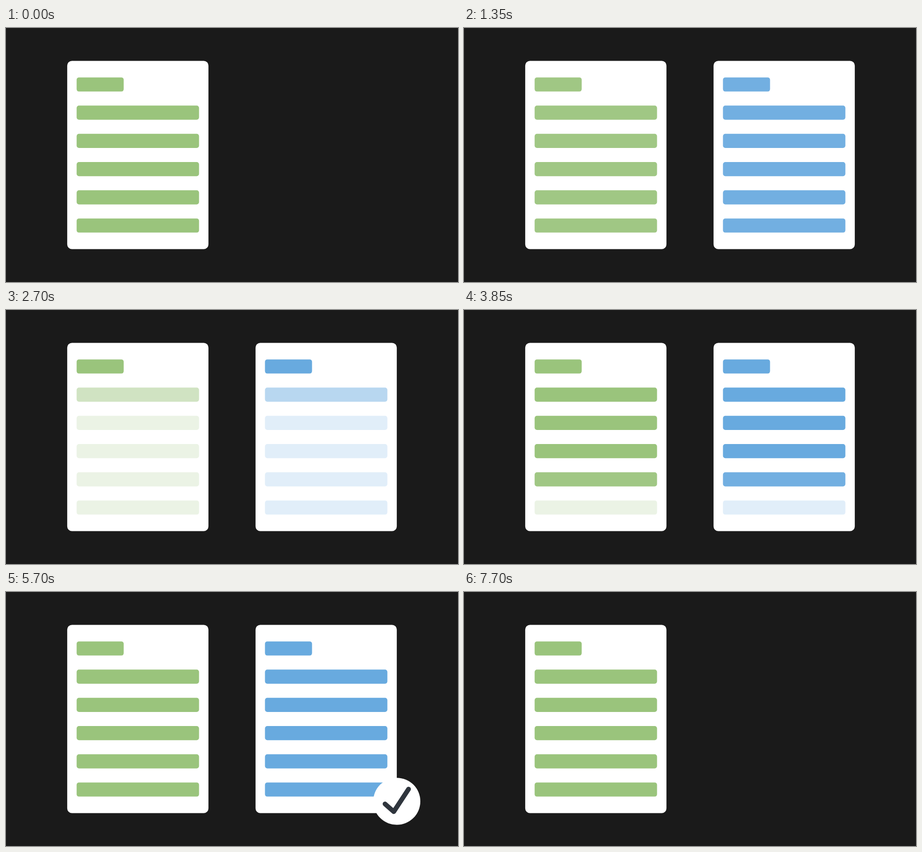
Write an HTML page that moves like this. It is 900 by 506 pixels and loops after 7800 ms.

```html
<!DOCTYPE html>
<html lang="en">
<head>
<meta charset="utf-8">
<title>Two pages</title>
<style>
  html, body { margin: 0; width: 100%; height: 100%; overflow: hidden; background: #1a1a1a; }
  svg { display: block; width: 100%; height: 100%; }
</style>
</head>
<body>
<svg id="stage" viewBox="0 0 960 540" preserveAspectRatio="none"></svg>
<script>
const LOOP = 7800, TICK = 50;
const stage = document.getElementById('stage');

function add(parent, tag, attrs) {
  const el = document.createElementNS('http://www.w3.org/2000/svg', tag);
  for (const key in attrs) el.setAttribute(key, attrs[key]);
  return parent.appendChild(el);
}

// A page with six bars, drawn around its own centre.
function makePage(color) {
  const group = add(stage, 'g', {});
  add(group, 'rect', { x: -150, y: -200, width: 300, height: 400, rx: 10, fill: '#fff' });
  const bars = [];
  for (let i = 0; i < 6; i++) {
    bars.push(add(group, 'rect', {
      x: -130, y: -165 + 60 * i, width: i ? 260 : 100, height: 30, rx: 5, fill: color
    }));
  }
  return { group, bars };
}

function makeBadge() {
  const group = add(stage, 'g', {});
  add(group, 'circle', { r: 50, fill: '#fff' });
  add(group, 'path', {
    d: 'M-25 5.5L-6.5 22L25-26', fill: 'none', stroke: '#2f353d',
    'stroke-width': 10, 'stroke-linecap': 'round', 'stroke-linejoin': 'round'
  });
  return group;
}

// Same curve as CSS ease-in-out: cubic-bezier(.42, 0, .58, 1).
function ease(x) {
  let lo = 0, hi = 1, s = x;
  for (let i = 0; i < 24; i++) {
    s = (lo + hi) / 2;
    const bx = 3 * s * (1 - s) * (1 - s) * 0.42 + 3 * s * s * (1 - s) * 0.58 + s * s * s;
    if (bx < x) lo = s; else hi = s;
  }
  return s * s * (3 - 2 * s);
}

// Value at time t in a list of [time, value] keys.
function track(keys, t) {
  if (t <= keys[0][0]) return keys[0][1];
  for (let i = 1; i < keys.length; i++) {
    const [t0, v0] = keys[i - 1], [t1, v1] = keys[i];
    if (t < t1) return v0 + (v1 - v0) * ease((t - t0) / (t1 - t0));
  }
  return keys[keys.length - 1][1];
}

const pageKeys = [[0, 0], [400, 1.1], [700, 1], [7000, 1], [7300, 1.1], [7700, 0]];
const badgeKeys = [[4850, 0], [5350, 1.11], [5700, 1], [6700, 1], [6950, 1.11], [7250, 0]];
const barKeys = i => {
  const start = 2250 + 350 * i;
  return [[1300, 1], [1550, 0.2], [start, 0.2], [start + 250, 1]];
};

const left = makePage('#9ac47c');
const right = makePage('#68aadf');
const badge = makeBadge();
left.group.setAttribute('transform', 'translate(280 270)');

function place(el, x, y, scale) {
  el.setAttribute('visibility', scale > 0 ? 'visible' : 'hidden');
  el.setAttribute('transform', `translate(${x} ${y}) scale(${scale})`);
}

function draw(t) {
  place(right.group, 680, 270, track(pageKeys, t));
  place(badge, 830, 445, track(badgeKeys, t));
  for (let i = 0; i < 6; i++) {
    const alpha = track(barKeys(i), t);
    left.bars[i].setAttribute('fill-opacity', alpha);
    right.bars[i].setAttribute('fill-opacity', alpha);
  }
}

const begin = performance.now();
function loop() {
  const t = Math.max(0, performance.now() - begin) % LOOP;
  draw(Math.floor(t / TICK) * TICK);
  requestAnimationFrame(loop);
}
draw(0);
requestAnimationFrame(loop);
</script>
</body>
</html>
```
